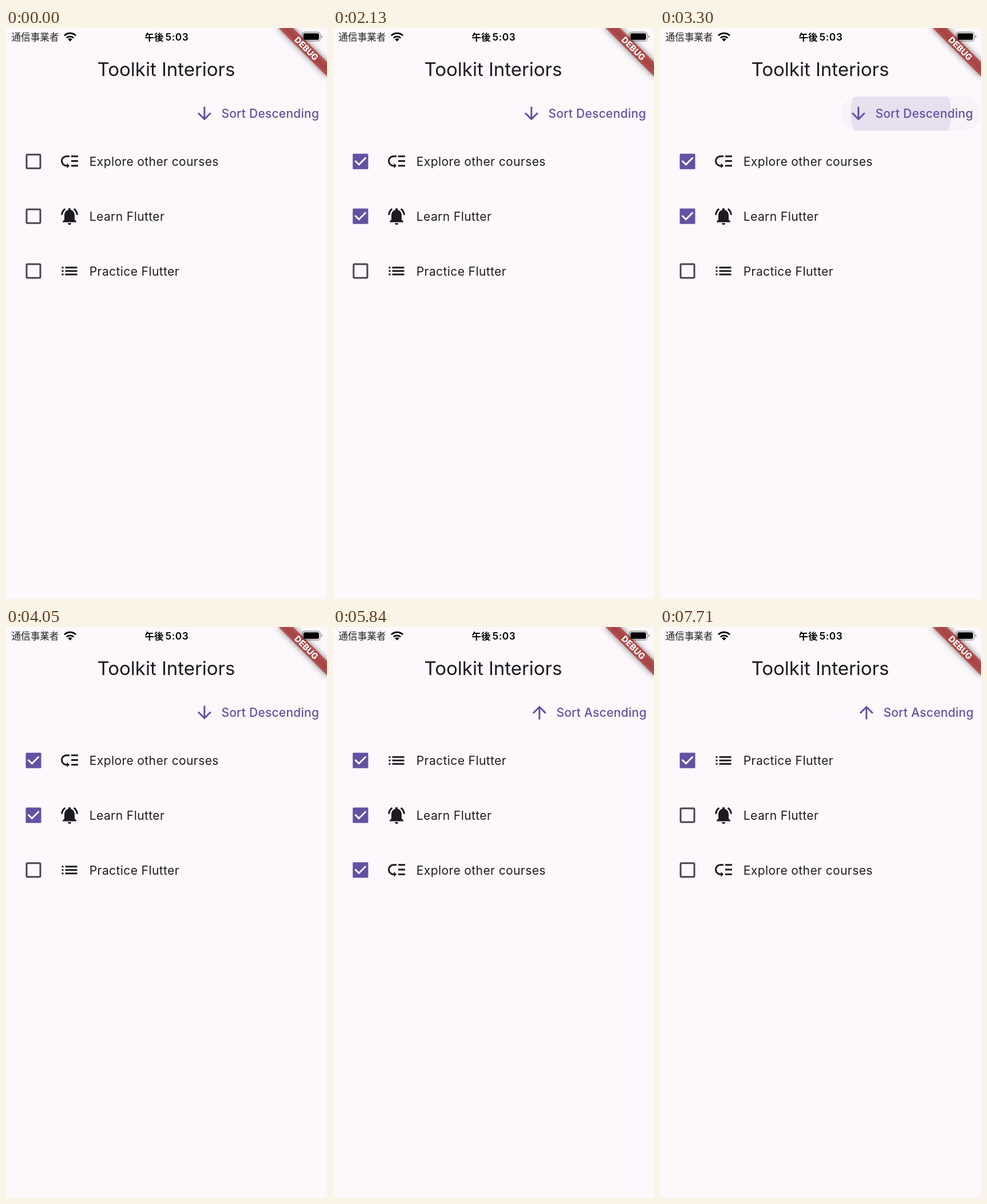
These frames come from a looping animation (561 px wide and 998 px high, 8000 ms). An HTML page:

```html
<!DOCTYPE html>
<html lang="ja">
<head>
<meta charset="utf-8">
<title>Todo list</title>
<style>
  html, body { margin: 0; width: 100%; height: 100%; overflow: hidden; background: #fcf8fb; }
  svg { display: block; width: 100vw; height: 100vh; font-family: Inter, Roboto, sans-serif; }
  .jp { font-family: "Noto Sans CJK JP", "Noto Sans CJK", "Noto Sans CJK SC", sans-serif; }
  .label { font-size: 21px; letter-spacing: .4px; }
  .sort { font-size: 21px; font-weight: 500; letter-spacing: .23px; }
</style>
</head>
<body>
<svg viewBox="0 0 561 998" fill="#1d1b20">
  <defs>
    <clipPath id="pillClip"><rect id="clipRect" y="119.7" height="59.8" rx="29.9"/></clipPath>
    <filter id="blur" x="-50%" y="-150%" width="200%" height="400%"><feGaussianBlur stdDeviation="5.9"/></filter>
  </defs>
  <rect width="561" height="998" fill="#fcf8fb"/>

  <text x="280" y="84" font-size="33" text-anchor="middle">Toolkit Interiors</text>

  <g fill="#6550a2">
    <g clip-path="url(#pillClip)">
      <rect id="highlight" x="300" y="119" width="261" height="61"/>
      <circle id="ripple" cy="149.6"/>
    </g>
    <path id="arrow"/>
    <text id="sortLabel" class="sort" y="157"></text>
  </g>

  <g id="list"></g>

  <!-- debug ribbon, rotated around the top right corner -->
  <g transform="translate(561 0) rotate(45)">
    <rect x="-60" y="41.9" width="120" height="18" opacity=".5" fill="#000" filter="url(#blur)"/>
    <rect x="-60" y="41.9" width="120" height="18" fill="#b71c1c" fill-opacity=".627"/>
    <text y="56.2" font-size="14.8" font-weight="800" text-anchor="middle" fill="#fff">DEBUG</text>
  </g>

  <!-- status bar -->
  <g fill="#000">
    <text class="jp" x="9.5" y="21.5" font-size="16.6" fill="#222">通信事業者</text>
    <text class="jp" x="242.5" y="21.5" font-size="16.4" font-weight="700">午後</text>
    <text x="278.5" y="21.5" font-size="17.3" font-weight="600" letter-spacing=".6">5:03</text>
    <path d="M112 23.5l-3.8-3.9a5.4 5.4 0 0 1 7.6 0z"/>
    <g fill="none" stroke="#000" stroke-width="2.7">
      <path d="M105.8 17.4a8.8 8.8 0 0 1 12.4 0"/>
      <path d="M102 13.3a14.3 14.3 0 0 1 20 0"/>
    </g>
    <rect x="517.6" y="7.2" width="31.6" height="15.6" rx="4.6" fill="none" stroke="#000" stroke-opacity=".4" stroke-width="1.4"/>
    <rect x="519.8" y="9.3" width="27.2" height="11.4" rx="2.8"/>
    <path d="M551 12.4q2 .8 2 2.6t-2 2.6z" opacity=".45"/>
  </g>
</svg>

<script>
const LOOP = 8000, PT = 561 / 375;
const PRIMARY = '#6550a2', INK = '#1d1b20';
const $ = id => document.getElementById(id);
const clamp = v => Math.min(1, Math.max(0, v));
const set = (el, attrs) => { for (const k in attrs) el.setAttribute(k, attrs[k]); };

const bezier = (x1, y1, x2, y2) => x => {
  const at = (a, b, s) => 3 * a * s * (1 - s) ** 2 + 3 * b * s * s * (1 - s) + s ** 3;
  let lo = 0, hi = 1;
  for (let i = 0; i < 24; i++) {
    const mid = (lo + hi) / 2;
    if (at(x1, x2, mid) < x) lo = mid; else hi = mid;
  }
  return at(y1, y2, hi);
};
const ease = bezier(.25, .1, .25, 1);
const easeIn = bezier(.42, 0, 1, 1);
const easeOut = bezier(0, 0, .58, 1);
const fastOutSlowIn = bezier(.4, 0, .2, 1);

const ARROW_DOWN = 'M20 12l-1.41-1.41L13 16.17V4h-2v12.17l-5.58-5.59L4 12l8 8 8-8z';
const ARROW_UP = 'M4 12l1.41 1.41L11 7.83V20h2V7.83l5.58 5.59L20 12l-8-8-8 8z';

const todos = [
  { text: 'Explore other courses',
    icon: 'M14 5h8v2h-8zm0 5.5h8v2h-8zm0 5.5h8v2h-8zM2 11.5C2 15.08 4.92 18 8.5 18H9v2l3-3-3-3v2h-.5C6.02 16 4 13.98 4 11.5S6.02 7 8.5 7H12V5H8.5C4.92 5 2 7.92 2 11.5z',
    taps: [{ down: 510, up: 590, on: true }, { down: 7330, up: 7455, on: false }] },
  { text: 'Learn Flutter',
    icon: 'M7.58 4.08L6.15 2.65C3.75 4.48 2.17 7.3 2.03 10.5h2c.15-2.65 1.51-4.97 3.55-6.42zm12.39 6.42h2c-.15-3.2-1.73-6.02-4.12-7.85l-1.42 1.43c2.02 1.45 3.39 3.77 3.54 6.42zM18 11c0-3.07-1.64-5.64-4.5-6.32V4c0-.83-.67-1.5-1.5-1.5s-1.5.67-1.5 1.5v.68C7.63 5.36 6 7.92 6 11v5l-2 2v1h16v-1l-2-2v-5zm-6 11c.14 0 .27-.01.4-.04.65-.14 1.18-.58 1.44-1.18.1-.24.15-.5.15-.78h-4c.01 1.1.9 2 2.01 2z',
    taps: [{ down: 990, up: 1124, on: true }, { down: 6330, up: 6430, on: false }] },
  { text: 'Practice Flutter',
    icon: 'M3 13h2v-2H3v2zm0 4h2v-2H3v2zm0-8h2V7H3v2zm4 4h14v-2H7v2zm0 4h14v-2H7v2zM7 7v2h14V7H7z',
    taps: [{ down: 5450, up: 5580, on: true }] },
];
const sortPresses = [
  { down: 2160, up: 2360, ascending: true },
  { down: 3040, up: 3280, ascending: false },
  { down: 4080, up: 4280, ascending: true },
];

const iconPlace = (x, y) => `translate(${x} ${y}) scale(${PT}) translate(-12 -12)`;

for (const todo of todos) {
  const row = document.createElementNS('http://www.w3.org/2000/svg', 'g');
  row.innerHTML = `
    <circle cx="48"/>
    <rect/>
    <path fill="none" stroke="#fff" stroke-width="3"/>
    <path d="${todo.icon}" transform="${iconPlace(111, 0)}"/>
    <text class="label" x="145.8" y="7.8">${todo.text}</text>`;
  $('list').append(row);
  todo.row = row;
  [todo.splash, todo.box, todo.check] = row.children;
}

function checkPath(progress) {
  const point = (x, y) => [34.5 + 27 * x, -13.5 + 27 * y];
  const mix = (a, b, s) => a.map((v, i) => v + (b[i] - v) * s);
  const start = point(.15, .45), mid = point(.4, .7), end = point(.85, .25);
  return progress < .5
    ? `M${start}L${mix(start, mid, progress * 2)}`
    : `M${start}L${mid}L${mix(mid, end, progress * 2 - 1)}`;
}

function drawCheckbox({ taps, splash, box, check }, t) {
  let value = 0, reaction = 0;
  for (const { down, up, on } of taps) {
    if (t >= up) {
      const x = clamp((t - up) / 200);
      value = on ? easeIn(x) : easeOut(1 - x);
    }
    if (t >= down) {
      reaction = clamp((Math.min(t, up) - down) / 100) - Math.max(0, t - up) / 100;
    }
  }
  set(splash, {
    r: 20 * PT * fastOutSlowIn(clamp(reaction)),
    fill: value < .5 ? PRIMARY : INK, 'fill-opacity': .12,
  });
  const filled = value > .5;
  const inset = (1 - Math.abs(value - .5) * 2) * PT;
  const edge = inset + (filled ? 0 : 1.5);
  const size = 27 - 2 * edge;
  set(box, {
    x: 34.5 + edge, y: -13.5 + edge, width: size, height: size, rx: 1.5,
    fill: filled ? PRIMARY : 'none',
    stroke: filled ? 'none' : '#49454f', 'stroke-width': 3,
  });
  set(check, { d: filled ? checkPath(value * 2 - 1) : '' });
}

const pillLeft = ascending => ascending ? 331 : 317;

function drawSort(t, ascending) {
  const left = pillLeft(ascending), width = 561 - left;
  set($('clipRect'), { x: left, width });
  set($('arrow'), {
    d: ascending ? ARROW_UP : ARROW_DOWN,
    transform: iconPlace(left + 29.8, 149.6),
  });
  $('sortLabel').textContent = ascending ? 'Sort Ascending' : 'Sort Descending';
  set($('sortLabel'), { x: left + 59.4 });

  const press = sortPresses.find(p => t >= p.down && t < p.up + 375);
  if (!press) {
    set($('ripple'), { r: 0 });
    set($('highlight'), { opacity: 0 });
    return;
  }
  const held = Math.min(t, press.up) - press.down, released = Math.max(0, t - press.up);
  const grow = ease(clamp(held / 1000 + released / 225));
  const reach = Math.hypot(561 - pillLeft(!press.ascending), 60) / 2;
  set($('ripple'), {
    cx: left + 80 + (width / 2 - 80) * grow,
    r: reach * .3 + (reach * .7 + 7.5) * grow,
    opacity: .12 * clamp(held / 75) * (1 - clamp((released - 225) / 150)),
  });
  set($('highlight'), { opacity: .035 * clamp(held / 200) * (1 - clamp(released / 90)) });
}

function draw() {
  const t = performance.now() % LOOP;
  const ascending = sortPresses.reduce((state, p) => t >= p.up ? p.ascending : state, false);
  drawSort(t, ascending);
  todos.forEach((todo, i) => {
    const slot = ascending ? 2 - i : i;
    set(todo.row, { transform: `translate(0 ${233.3 + slot * 64 * PT})` });
    drawCheckbox(todo, t);
  });
  requestAnimationFrame(draw);
}
draw();
</script>
</body>
</html>
```
